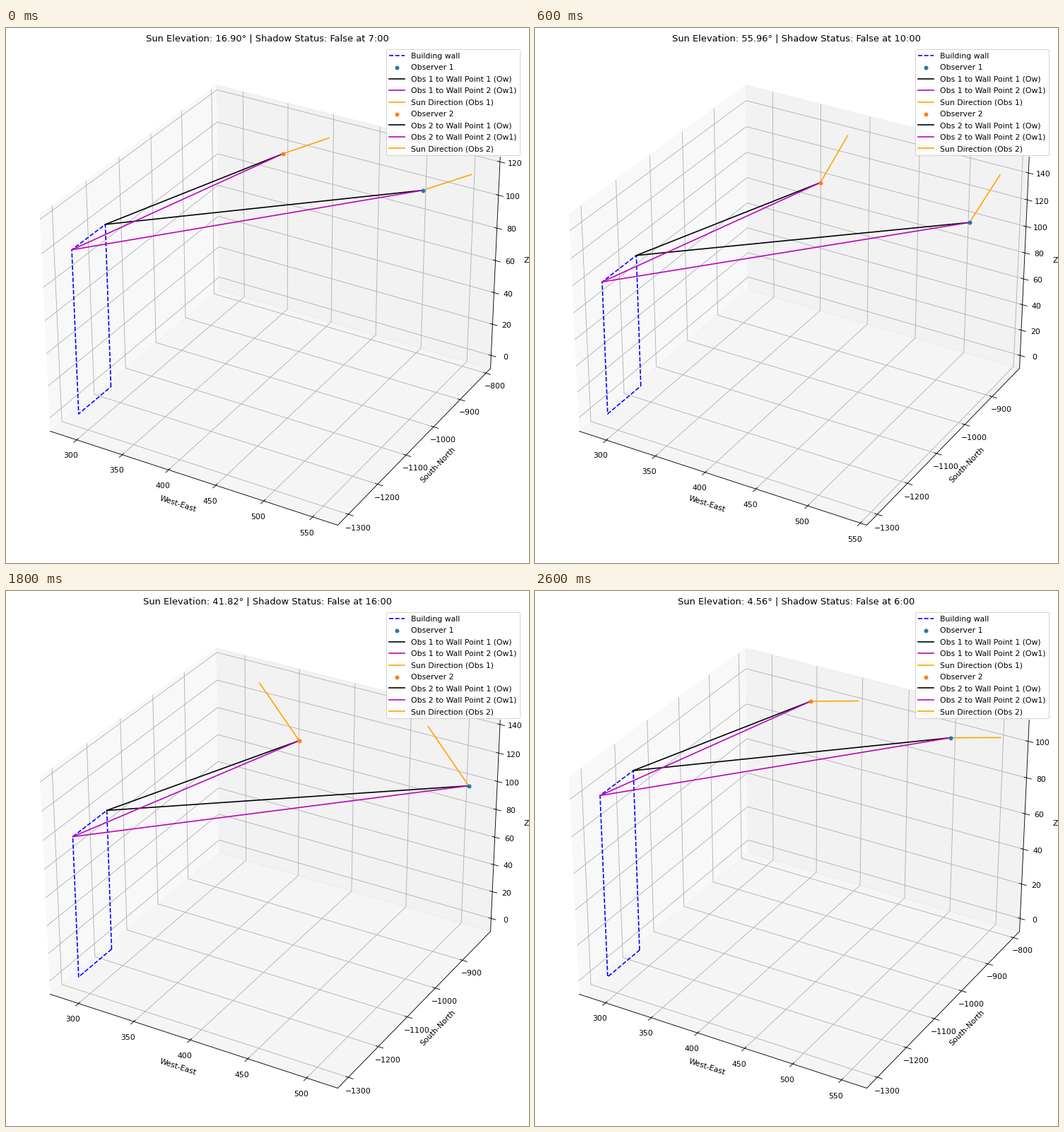
A matplotlib script for the animation above (2800 ms loop, 740 by 757 pixels).

```python
import numpy as np
import matplotlib.pyplot as plt
from matplotlib.animation import FuncAnimation

WIDTH, HEIGHT = 740, 757
DPI = 78.39
SIDE, PAD = 724.32, 7.84          # square axes and its margin, in pixels

HOURS = list(range(7, 20)) + [6]
ELEVATION = dict(zip(range(6, 20), [
    4.56, 16.90, 29.72, 42.79, 55.96, 68.99, 80.66,
    79.96, 68.05, 54.99, 41.82, 28.76, 15.95, 3.66]))

LATITUDE, DECLINATION = np.radians([28.48, 21.55])
SOLAR_NOON = 12.464
RAY = 50

WALL_X, WALL_Y1, WALL_Y2, TOP = 290, -1200, -1300, 100
OBSERVERS = [(510, -830, TOP), (360, -830, TOP)]

fig = plt.figure(figsize=((WIDTH + .01) / DPI, (HEIGHT + .01) / DPI), dpi=DPI)
ax = fig.add_axes([PAD / WIDTH, PAD / HEIGHT, SIDE / WIDTH, SIDE / HEIGHT],
                  projection="3d")


def sun_vector(hour):
    """Unit vector (east, north, up) towards the sun."""
    angle = np.radians(15 * (hour - SOLAR_NOON))
    east = -np.cos(DECLINATION) * np.sin(angle)
    north = (np.cos(LATITUDE) * np.sin(DECLINATION)
             - np.sin(LATITUDE) * np.cos(DECLINATION) * np.cos(angle))
    elevation = np.radians(ELEVATION[hour])
    flat = np.cos(elevation) / np.hypot(east, north)
    return np.array([east * flat, north * flat, np.sin(elevation)])


def segment(start, end, color, label):
    ax.plot(*zip(start, end), color=color, label=label)


def trim_ticks(axis, limits):
    """Keep ticks out of the thin margin at both ends of an axis."""
    low, high = limits
    margin = (high - low) / 50
    low, high = low + margin, high - margin
    ticks = axis.get_major_locator().tick_values(low, high)
    axis.set_ticks([t for t in ticks if low <= t <= high])


def draw(i):
    hour = HOURS[i]
    ax.clear()
    ax.plot([WALL_X] * 5,
            [WALL_Y1, WALL_Y1, WALL_Y2, WALL_Y2, WALL_Y1],
            [0, TOP, TOP, 0, 0], "b--", label="Building wall")

    for n, spot in enumerate(OBSERVERS, 1):
        ax.scatter(*spot, color=f"C{n - 1}", label=f"Observer {n}")
        segment(spot, (WALL_X, WALL_Y1, TOP), "k",
                f"Obs {n} to Wall Point 1 (Ow)")
        segment(spot, (WALL_X, WALL_Y2, TOP), "m",
                f"Obs {n} to Wall Point 2 (Ow1)")
        segment(spot, spot + RAY * sun_vector(hour), "orange",
                f"Sun Direction (Obs {n})")

    trim_ticks(ax.xaxis, ax.get_xlim())
    trim_ticks(ax.yaxis, ax.get_ylim())
    trim_ticks(ax.zaxis, ax.get_zlim())
    ax.set_xlabel("West-East")
    ax.set_ylabel("South-North")
    ax.set_zlabel("Z")
    ax.set_title(f"Sun Elevation: {ELEVATION[hour]:.2f}° | "
                 f"Shadow Status: False at {hour}:00", fontsize=11.9)
    ax.legend(loc="upper right", labelspacing=.59)
    return []


anim = FuncAnimation(fig, draw, frames=len(HOURS), interval=200, repeat=True)
plt.show()
```
